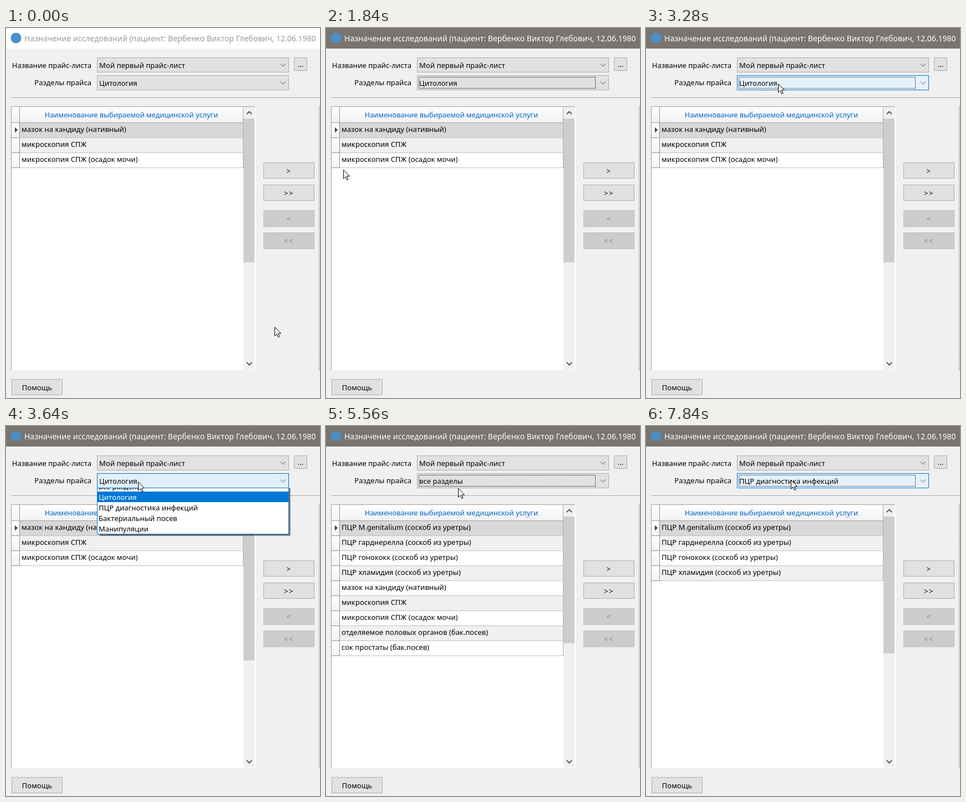
Recreate the animation shown at these times as an HTML page. Size 566 px wide and 666 px high, loop 8 s.

```html
<!DOCTYPE html>
<html lang="ru">
<head>
<meta charset="utf-8">
<title>Назначение исследований</title>
<style>
  html, body { margin: 0; width: 100%; height: 100%; overflow: hidden; background: #f0f0f0; }
  svg { display: block; width: 566px; height: 666px; }
  text { font: 13px "Noto Sans", "Open Sans", sans-serif; white-space: pre; }
  #title text { font-size: 14px; }
  .head { font-size: 12.8px; }
  .sign { letter-spacing: 1.6px; }
  rect { shape-rendering: crispEdges; }
</style>
</head>
<body>
<svg viewBox="0 0 566 666" xmlns="http://www.w3.org/2000/svg">
  <defs>
    <linearGradient id="shine" x2="0" y2="1">
      <stop offset="0" stop-color="#fff"/><stop offset="1" stop-color="#f1f1f1"/>
    </linearGradient>
    <clipPath id="below"><rect x="160" y="112" width="360" height="110"/></clipPath>
  </defs>
  <g id="title"></g>
  <g id="fixed"></g>
  <g id="grid"></g>
  <g id="combo"></g>
  <g id="drop" clip-path="url(#below)"></g>
  <path id="cursor" d="M.5 .5V16.2L4.2 12.7L6.7 18.5L9 17.5L6.6 11.8H11.6Z" fill="#fff" stroke="#000"/>
</svg>
<script>
const LOOP = 8000, STEP = 40, FADE = 280;
const OPEN = 3440, SLIDE = 234, CLOSE = 4840;
const $ = id => document.getElementById(id);

const pcr = ['M.genitalium', 'гарднерелла', 'гонококк', 'хламидия'].map(s => `ПЦР ${s} (соскоб из уретры)`);
const cytology = ['мазок на кандиду (нативный)', 'микроскопия СПЖ', 'микроскопия СПЖ (осадок мочи)'];
const everything = [...pcr, ...cytology, 'отделяемое половых органов (бак.посев)', 'сок простаты (бак.посев)'];

const sections = [
  { name: 'все разделы', rows: everything, thumb: 228 },
  { name: 'Цитология', rows: cytology, thumb: 259 },
  { name: 'ПЦР диагностика инфекций', rows: pcr, thumb: 246 },
  { name: 'Бактериальный посев' },
  { name: 'Манипуляции' }
];

// start, end, and where the pointer goes
const moves = [
  [80, 280, 480, 506], [520, 1120, 201, 106], [2640, 3080, 238, 100], [4040, 4200, 238, 116],
  [5240, 5360, 238, 119], [5520, 5560, 238, 112], [5720, 6000, 249, 97], [6960, 7000, 261, 97]
];
// when the section box fades to 0 normal, 1 hovered, 2 pressed
const states = [[1040, 1], [1400, 0], [2640, 1], [3600, 2], [CLOSE, 0], [5720, 1]];
const fills = [[225, 225, 225], [229, 241, 251], [204, 228, 247]];
const edges = [[173, 173, 173], [0, 120, 215], [0, 84, 153]];

const part = (t, from, to) => Math.max(0, Math.min(1, (t - from) / (to - from)));
const ease = u => u * u * (3 - 2 * u);
const mix = (a, b, u) => a + (b - a) * u;

function pointer(t) {
  let x = 484, y = 538;
  for (const [from, to, x1, y1] of moves) {
    const u = ease(part(t, from, to));
    x = mix(x, x1, u);
    y = mix(y, y1, u);
  }
  // one round trip over the list
  const a = 2 * Math.PI * ease(part(t, 1400, 2440)), tilt = 0.2;
  x -= 97 * (1 - Math.cos(a));
  y += 94 * (Math.cos(tilt) - Math.cos(a - tilt));
  return [Math.round(x), Math.round(y)];
}

const heat = t => states.reduce((h, [at, to]) => mix(h, to, part(t, at, at + FADE)), 0);

function shade(stops, level) {
  const i = Math.min(1, Math.floor(level));
  return `rgb(${stops[i].map((v, j) => Math.round(mix(v, stops[i + 1][j], level - i)))})`;
}

const rect = (x, y, w, h, fill) => `<rect x="${x}" y="${y}" width="${w}" height="${h}" fill="${fill}"/>`;
const box = (x, y, w, h, fill, edge) => rect(x, y, w, h, edge) + rect(x + 1, y + 1, w - 2, h - 2, fill);
const text = (x, y, s, fill = '#000', more = '') => `<text x="${x}" y="${y}" fill="${fill}" ${more}>${s}</text>`;
const line = (d, color, width) => `<path d="${d}" fill="none" stroke="${color}" stroke-width="${width}"/>`;
const mid = 'text-anchor="middle"', end = 'text-anchor="end"';

function button(x, y, w, h, label, off, more = '') {
  return box(x, y, w, h, off ? '#ccc' : '#e1e1e1', off ? '#bfbfbf' : '#adadad') +
    text(x + w / 2, y + h / 2 + 5, label, off ? '#838383' : '#000', mid + more);
}

function comboBox(y, label, level) {
  return box(164, y, 346, 27, shade(fills, level), shade(edges, level)) +
    text(168, y + 19, label) +
    line(`M495 ${y + 11.5}l4.5 4.5l4.5 -4.5`, '#444', 1);
}

function titleBar(active) {
  return rect(0, 0, 566, 37, active ? '#79746f' : '#fff') +
    '<circle cx="18" cy="18" r="9.5" fill="#4a8fc7"/>' +
    text(33, 24, 'Назначение исследований (пациент: Вербенко Виктор Глебович, 12.06.1980', active ? '#fff' : '#999');
}

function fixedParts() {
  const signs = [['&gt;', 242], ['&gt;&gt;', 282], ['&lt;', 328], ['&lt;&lt;', 368]];
  return text(154, 72, 'Название прайс-листа', '#000', end) +
    text(154, 103, 'Разделы прайса', '#000', end) +
    comboBox(53, 'Мой первый прайс-лист', 0) +
    button(519, 53, 24, 24, '...') +
    rect(9, 125, 557, 1, '#a0a0a0') + rect(9, 126, 557, 1, '#fff') +
    signs.map(([s, y], i) => button(464, y, 92, i < 2 ? 29 : 30, s, i > 1, ' class="sign"')).join('') +
    button(10, 632, 92, 29, 'Помощь') +
    rect(564, 141, 2, 475, '#fff') + rect(564, 141, 1, 475, '#a0a0a0') +
    [141, 208, 235, 587, 615].map(y => rect(564, y, 2, 1, '#a0a0a0')).join('');
}

function grid({ rows, thumb }) {
  let s = rect(9, 141, 440, 475, '#a0a0a0') + rect(10, 142, 440, 474, '#fff') +
    rect(10, 142, 418, 28, 'url(#shine)') +
    text(226, 161, 'Наименование выбираемой медицинской услуги', '#0066cc', mid + ' class="head"') +
    rect(10, 170, 418, 1, '#a0a0a0');
  rows.forEach((label, i) => {
    const y = 171 + 27 * i;
    s += rect(10, y, 14, 26, 'url(#shine)') +
      rect(24, y, 404, 26, i === 0 ? '#d8d8d8' : i % 2 ? '#f0f0f0' : '#fff') +
      rect(10, y + 26, 14, 1, '#909090') + rect(24, y + 26, 404, 1, '#c0c0c0') +
      text(28, y + 16, label);
  });
  const h = 29 + 27 * rows.length;
  return s + rect(24, 142, 1, h, '#909090') + rect(427, 142, 1, h, '#b0b0b0') +
    '<path d="M16 178.5L21 183.5L16 188.5Z" fill="#404040"/>' +
    rect(428, 142, 20, 473, '#f0f0f0') + rect(428, 163, 20, thumb, '#cdcdcd') +
    line('M434 155l4.5 -4.5l4.5 4.5M434 602l4.5 4.5l4.5 -4.5', '#505050', 1.9);
}

function dropList(shownPart, hot) {
  const y = 112 - Math.round(97 * (1 - shownPart));
  return [4, 5].map(d => `<g opacity=".3">${rect(164 + d, y + d, 344, 95, '#000')}</g>`).join('') +
    box(164, y, 346, 97, '#fff', '#0078d7') +
    sections.map(({ name }, i) => {
      const top = y + 1 + 19 * i;
      return (i === hot ? rect(165, top, 344, 19, '#0078d7') : '') +
        text(167, top + 15, name, i === hot ? '#fff' : '#000');
    }).join('');
}

const shown = {};
function put(id, html) {
  if (shown[id] !== html) $(id).innerHTML = shown[id] = html;
}

function draw(ms) {
  const t = Math.floor((ms % LOOP) / STEP) * STEP;
  const [x, y] = pointer(t);
  const active = t >= 80, open = t > OPEN && t < CLOSE;
  const section = sections[t < CLOSE ? 1 : t < 6200 ? 0 : t < 7840 ? 1 : 2];
  const focus = active && !open
    ? '<rect x="167.5" y="88.5" width="318" height="20" fill="none" stroke="#000" stroke-dasharray="1"/>' : '';

  put('title', titleBar(active));
  put('grid', grid(section));
  put('combo', comboBox(85, section.name, heat(t)) + focus);
  put('drop', open ? dropList(part(t, OPEN, OPEN + SLIDE), y >= 113 ? 0 : 1) : '');
  $('cursor').setAttribute('transform', `translate(${x} ${y})`);
}

put('fixed', fixedParts());
const start = performance.now();
function tick() {
  draw(performance.now() - start);
  requestAnimationFrame(tick);
}
tick();
</script>
</body>
</html>
```
